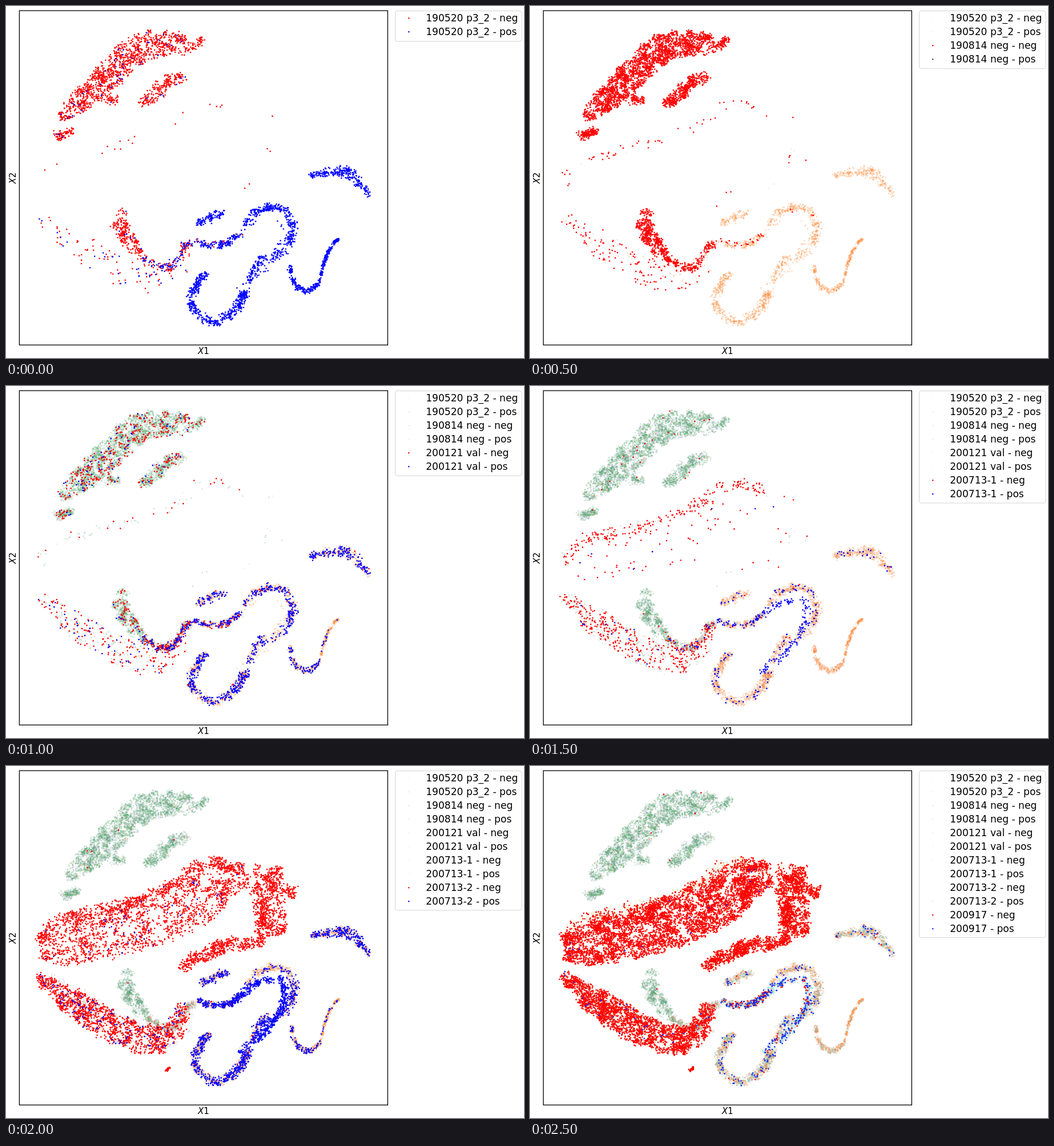
An HTML page with a canvas for the animation above (3 s loop, 907 by 617 pixels).

```html
<!DOCTYPE html>
<html lang="en">
<head>
<meta charset="utf-8">
<title>Scatter plot build-up</title>
<style>
html, body { margin: 0; width: 100%; height: 100%; overflow: hidden; background: #fff; }
canvas { display: block; }
</style>
</head>
<body>
<canvas id="plot" width="907" height="617"></canvas>
<script>
const ctx = document.getElementById('plot').getContext('2d');
const FONT = '"DejaVu Sans", sans-serif';
const STEP = 500, RED = '#f00', BLUE = '#00f';

let seed = 20517;
function random() {
  seed = (seed + 0x6D2B79F5) | 0;
  let t = Math.imul(seed ^ (seed >>> 15), seed | 1);
  t ^= t + Math.imul(t ^ (t >>> 7), t | 61);
  return ((t ^ (t >>> 14)) >>> 0) / 4294967296;
}

// Catmull-Rom spline through the key points, u in 0..1.
function spline(keys, u) {
  const last = keys.length / 2 - 1;
  const i = Math.min(last - 1, Math.floor(u * last)), t = u * last - i;
  return [0, 1].map(axis => {
    const [a, b, c, d] = [-1, 0, 1, 2].map(k => keys[Math.max(0, Math.min(last, i + k)) * 2 + axis]);
    return b + ((c - a) * t + (2 * a - 5 * b + 4 * c - d) * t * t + (3 * b - a - 3 * c + d) * t ** 3) / 2;
  });
}

// A band follows a spline; taper narrows both ends. It is filled with small
// round clumps, shared by every group that has dots there.
function band(family, width, taper, ...keys) {
  const slices = Array.from({ length: 80 }, (_, i) => {
    const u = (i + 0.5) / 80;
    const [x0, y0] = spline(keys, u - 0.5 / 80), [x1, y1] = spline(keys, u + 0.5 / 80);
    const half = width * (1 - taper * (2 * u - 1) ** 2);
    return { x0, y0, dx: x1 - x0, dy: y1 - y0, half, area: 2 * half * Math.hypot(x1 - x0, y1 - y0) };
  });
  const area = slices.reduce((sum, s) => sum + s.area, 0);
  const largest = Math.max(...slices.map(s => s.area));
  const pickSlice = () => {
    for (;;) {
      const s = slices[Math.floor(random() * slices.length)];
      if (random() * largest < s.area) return s;
    }
  };
  const radius = Math.min(6, 0.6 * width);
  const clumps = Array.from({ length: Math.ceil(area / (1.2 * radius ** 2)) }, () => {
    const s = pickSlice(), along = random();
    const off = (2 * random() - 1) * Math.max(0, s.half - radius * 0.7) / Math.hypot(s.dx, s.dy);
    return [s.x0 + s.dx * along - s.dy * off, s.y0 + s.dy * along + s.dx * off];
  });
  return { family, area, radius, clumps };
}

const bands = [
  band('cells', 29, 0.65, 97,198, 122,172, 150,152, 180,120, 214,83, 262,66, 312,66, 345,62),
  band('cells', 11, 0.5, 74,233, 118,217),
  band('cells', 11, 0, 178,164, 200,163),
  band('cells', 16, 0.6, 237,173, 262,154, 286,134, 315,124),
  band('cells', 17, 0.6, 208,358, 199,382, 215,412, 240,443),
  band('neck', 8, 0, 240,443, 272,459, 297,452, 309,424, 328,413),
  band('bridge', 8, 0, 328,413, 365,420, 395,411, 412,392),
  band('arch', 8, 0, 412,390, 430,368, 458,353, 490,361, 504,384),
  band('worm', 10, 0.1, 504,384, 490,425, 441,453, 424,490, 398,536, 360,553, 327,528, 333,490, 353,472),
  band('worm', 10, 0.3, 335,381, 358,371, 383,362),
  band('worm', 11, 0.4, 533,300, 580,290, 612,300, 633,333),
  band('inner', 8, 0, 398,410, 434,382, 477,376, 483,414, 453,461, 404,502),
  band('hook', 6, 0.2, 497,456, 505,488, 528,499, 548,485),
  band('whip', 3.2, 0.4, 548,485, 558,447, 571,419, 585,407),
  band('ridge', 13, 0, 62,310, 80,276, 150,256, 215,240, 280,214, 350,170, 418,184),
  band('slab', 48, 0.5, 58,320, 105,312, 210,286, 318,243, 370,205, 422,186),
  band('belt', 29, 0.55, 60,366, 88,394, 128,420, 175,453, 225,475, 270,480, 297,460, 312,420),
  band('claw', 29, 0, 459,175, 457,220, 463,260, 464,298),
  band('claw', 13, 0, 484,214, 505,222),
  band('claw', 17, 0.5, 452,306, 385,316, 345,330, 306,355),
  band('speck', 3, 0, 279,535, 287,528),
];
const WIDE = ['ridge', 'slab', 'belt', 'claw', 'speck'];

// Dots per square pixel in each family, and the tints a group fades to.
const groups = [
  { name: '190520 p3_2', fade: ['rgba(150,150,190,.15)', 'rgba(253,141,60,.35)'],
    neg: { cells: 0.09, neck: 0.045, bridge: 0.015, ridge: 0.0015, belt: 0.005, claw: 0.0004 },
    pos: { cells: 0.003, neck: 0.045, bridge: 0.1, arch: 0.13, worm: 0.12, inner: 0.01, hook: 0.2, whip: 0.42,
      belt: 0.002 } },
  { name: '190814 neg', fade: ['rgba(70,160,95,.28)', 'rgba(253,141,60,.3)'], posColor: '#444',
    neg: { cells: 0.18, neck: 0.1, bridge: 0.015, arch: 0.002, ridge: 0.005, belt: 0.009, claw: 0.0007 }, pos: {} },
  { name: '200121 val', fade: ['rgba(130,130,200,.2)', 'rgba(225,125,85,.25)'],
    neg: { cells: 0.022, neck: 0.07, bridge: 0.035, arch: 0.009, worm: 0.003, ridge: 0.002, belt: 0.01 },
    pos: { cells: 0.004, neck: 0.05, bridge: 0.055, arch: 0.055, worm: 0.065, hook: 0.08, whip: 0.03, belt: 0.003 } },
  { name: '200713-1', fade: ['rgba(250,160,160,.2)', 'rgba(250,175,130,.25)'],
    neg: { cells: 0.0012, neck: 0.02, bridge: 0.006, arch: 0.002, worm: 0.001, ridge: 0.02, slab: 0.002, belt: 0.022,
      claw: 0.0008 },
    pos: { neck: 0.012, bridge: 0.03, arch: 0.015, worm: 0.01, inner: 0.042, belt: 0.001, slab: 0.0002 } },
  { name: '200713-2', fade: ['rgba(225,222,150,.35)', 'rgba(90,195,190,.28)'],
    neg: { cells: 0.0003, bridge: 0.016, worm: 0.003, ridge: 0.07, slab: 0.055, belt: 0.095, claw: 0.12, speck: 0.5 },
    pos: { bridge: 0.14, arch: 0.03, worm: 0.095, inner: 0.14, hook: 0.075, whip: 0.04, slab: 0.0015, belt: 0.007 } },
  { name: '200917', fade: ['', ''], posColor: '#0a2aff',
    neg: { cells: 0.0003, bridge: 0.045, worm: 0.003, inner: 0.014, ridge: 0.03, slab: 0.17, belt: 0.18, claw: 0.19,
      speck: 0.5 },
    pos: { bridge: 0.045, arch: 0.01, worm: 0.012, inner: 0.035, slab: 0.0006, belt: 0.002 } },
];

// The last two plots show a slightly wider x range; the wide bands are laid out in it.
const SQUEEZE = 0.979;
const squeeze = x => 640 - (640 - x) * SQUEEZE;
const unsqueeze = x => 640 - (640 - x) / SQUEEZE;

function scatter(density, late) {
  return bands.flatMap(({ family, area, radius, clumps }) => {
    const count = Math.round(area * (density[family] || 0));
    return Array.from({ length: count }, () => {
      const [cx, cy] = clumps[Math.floor(random() * clumps.length)];
      const angle = random() * 2 * Math.PI, r = radius * Math.sqrt(random());
      const x = cx + r * Math.cos(angle), y = cy + r * Math.sin(angle);
      return [late && WIDE.includes(family) ? unsqueeze(x) : x, y];
    });
  });
}
groups.forEach((g, i) => { g.dots = [scatter(g.neg, i > 3), scatter(g.pos, i > 3)]; });

function dot(x, y, r = 1.3) {
  ctx.beginPath();
  ctx.arc(x, y, r, 0, 7);
  ctx.fill();
}

function axisLabel(digit, x, y, turn) {
  ctx.save();
  ctx.translate(x, y);
  ctx.rotate(turn);
  ctx.font = `italic 15px ${FONT}`;
  ctx.fillText('X', -10, 0);
  ctx.font = `15px ${FONT}`;
  ctx.fillText(digit, 0.3, 0);
  ctx.restore();
}

function draw(current) {
  ctx.fillStyle = '#fff';
  ctx.fillRect(0, 0, 907, 617);
  const shown = groups.slice(0, current + 1);
  const color = (g, i, kind) => i < current ? g.fade[kind] : kind ? g.posColor || BLUE : RED;

  shown.forEach((g, i) => g.dots.forEach((dots, kind) => {
    ctx.fillStyle = color(g, i, kind);
    for (const [x, y] of dots) dot(current > 3 ? squeeze(x) : x, y);
  }));

  ctx.strokeStyle = '#000';
  ctx.lineWidth = 1.3;
  ctx.strokeRect(23.4, 8.2, 645, 586);
  ctx.fillStyle = '#000';
  axisLabel('1', 346, 609.5, 0);
  axisLabel('2', 16.5, 301.5, -Math.PI / 2);

  ctx.strokeStyle = '#d3d3d3';
  ctx.lineWidth = 1;
  ctx.beginPath();
  ctx.roundRect(681.5, 8.5, 221.5, 53.5 + current * 47.7, 3.5);
  ctx.stroke();
  ctx.font = `17.1px ${FONT}`;
  shown.forEach((g, i) => ['neg', 'pos'].forEach((kind, k) => {
    const y = 21.3 + (2 * i + k) * 24;
    ctx.globalAlpha = i < current ? 0.6 : 1;
    ctx.fillStyle = color(g, i, k);
    dot(705.3, y, 1.2);
    ctx.globalAlpha = 1;
    ctx.fillStyle = '#000';
    ctx.fillText(`${g.name} - ${kind}`, 735.2, y + 6);
  }));
}

let drawn = -1;
function tick() {
  const current = Math.floor(performance.now() / STEP) % groups.length;
  if (current !== drawn) draw(drawn = current);
  requestAnimationFrame(tick);
}
tick();
</script>
</body>
</html>
```
